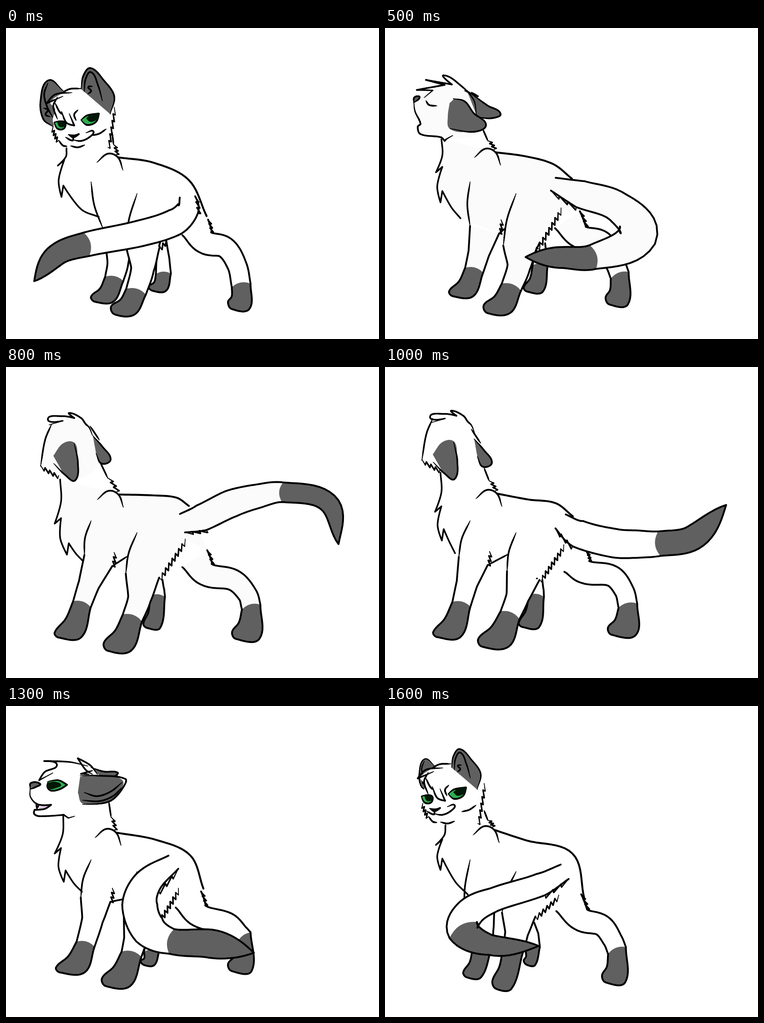
Animation of 820 by 683 pixels, one loop 1700 ms. Source, as an HTML page with a canvas:

```html
<!DOCTYPE html>
<html lang="en">
<head>
<meta charset="utf-8">
<title>Turning cat</title>
<style>
html, body { margin: 0; width: 100%; height: 100%; overflow: hidden; background: #fff; }
canvas { display: block; }
</style>
</head>
<body>
<canvas id="stage" width="820" height="683"></canvas>
<script>
const ctx = document.getElementById('stage').getContext('2d');
const LOOP = 1700, STEP = 100, SAMPLES = 10;
const GREY = '#606060', GREEN = '#2fae50', PUPIL = '#031806', PINK = '#e3c3e6';

// Key poses. A leg is a centre line followed by its toe; the tail is "x,y,width" from base to tip.
const poses = [
  {
    at: 0, head: () => frontHead(0), nape: '233,228', rump: '352,465',
    back: '246,284 325,296 402,334 441,413', chest: '133,264 114,302 122,371 204,415',
    foreFar: '246,440 246,515 238,551 187,590', foreNear: '301,480 300,530 286,579 231,612',
    hindFar: '346,465 345,505 346,540 314,568', hindNear: '416,438 437,470 482,482 508,522 517,565 488,602',
    tail: '399,371,34 400,397,48 372,426,58 295,451,57 177,475,53 113,497,47 62,556,0'
  },
  {
    at: 300, head: dozingHead, nape: '214,192', rump: '388,386', elbow: true,
    back: '244,277 300,289 370,303 412,337', chest: '125,249 112,326 138,390 188,421',
    foreFar: '228,470 226,517 217,546 161,580', foreNear: '304,490 297,535 285,578 231,610',
    hindFar: '343,500 342,520 340,542 316,562', hindNear: '440,460 470,475 494,494 508,528 510,557 467,598',
    tail: '370,345,50 437,372,66 471,424,78 420,470,60 297,489,60 232,485,44 163,480,0'
  },
  {
    at: 500, head: raisedHead, nape: '215,222', rump: '387,395', elbow: true, skin: '#fbfbfb',
    back: '243,273 310,282 370,299 411,331', chest: '124,243 112,317 122,383 166,418',
    foreFar: '219,443 206,495 196,532 141,578', foreNear: '297,480 294,525 278,569 217,609',
    hindFar: '346,472 342,500 341,522 305,570', hindNear: '401,421 428,458 478,470 507,520 516,543 485,592',
    tail: '370,343,30 430,365,60 512,393,66 555,455,86 457,503,54 390,504,46 309,503,0'
  },
  {
    at: 800, head: () => backHead(0), nape: '206,207', rump: '394,378', elbow: true, skin: '#fbfbfb',
    back: '247,280 325,282 375,287 402,305', chest: '119,247 107,344 134,412 168,425',
    foreFar: '203,425 182,478 167,521 107,583', foreNear: '300,458 293,510 278,551 215,606',
    hindFar: '338,466 334,487 333,504 302,564', hindNear: '415,421 440,455 500,468 531,500 539,527 497,582',
    tail: '388,343,42 430,331,58 495,300,60 552,284,52 608,275,43 708,298,42 731,389,0'
  },
  {
    at: 1000, head: () => backHead(1), nape: '218,222', rump: '393,390', elbow: true,
    back: '246,278 315,291 375,299 413,328', chest: '122,232 110,318 125,381 154,409',
    foreFar: '194,426 180,476 168,521 106,582', foreNear: '304,458 291,506 275,545 205,597',
    hindFar: '340,466 335,487 333,503 294,562', hindNear: '419,428 440,450 499,459 526,492 534,524 490,573',
    tail: '386,339,38 424,366,60 505,387,63 555,389,60 603,388,54 677,375,54 750,303,0'
  },
  {
    at: 1300, head: sideHead, nape: '226,210', rump: '379,400', elbow: true,
    back: '242,278 330,294 405,328 434,401', chest: '126,240 107,324 127,386 167,408',
    foreFar: '197,425 190,470 175,523 110,574', foreNear: '295,470 284,515 276,545 211,598',
    hindFar: '322,510 320,525 320,540 296,560', hindNear: '401,425 425,460 487,477 512,500 522,511 488,567',
    tail: '368,343,36 312,387,62 294,436,77 315,492,76 364,517,55 450,522,62 545,542,0'
  },
  {
    at: 1600, head: () => frontHead(1), nape: '218,230', rump: '382,415',
    back: '240,272 310,295 412,324 438,422', chest: '133,262 112,305 122,360 182,414',
    foreFar: '208,458 215,496 213,533 172,585', foreNear: '294,458 289,500 281,537 236,604',
    hindFar: '322,476 323,500 324,530 305,560', hindNear: '404,432 430,468 477,482 501,515 510,537 477,592',
    tail: '395,364,36 343,392,50 240,425,52 188,452,64 172,492,70 232,525,44 338,527,0'
  }
];

// Widths down the leg, and the heel's offset from ankle (x) and toe (y); back to front.
const legShapes = {
  hindFar: { widths: [12, 28, 33], heel: [6, 9] },
  hindNear: { widths: [66, 51, 46, 42, 42], heel: [18, 15] },
  foreFar: { widths: [66, 46, 41], heel: [-2, 11] },
  foreNear: { widths: [74, 50, 45], heel: [-3, 17] }
};

const point = (x, y, w = 0, sharp = false) => ({ x, y, w, sharp });
const mix = (a, b, t) => a + (b - a) * t;
const between = (a, b, t, dx = 0, dy = 0) => point(mix(a.x, b.x, t) + dx, mix(a.y, b.y, t) + dy, mix(a.w, b.w, t));
const corner = p => ({ ...p, sharp: true });
const parse = text => [...text.matchAll(/(\d+),(\d+)(?:,(\d+))?(!?)/g)]
  .map(([, x, y, w, bang]) => point(+x, +y, +(w || 0), bang === '!'));

// Smooth curve through the points; sharp points become corners.
function curve(pts) {
  const last = pts.length - 1, out = [];
  const direction = i => {
    const a = pts[Math.max(i - 1, 0)], b = pts[Math.min(i + 1, last)];
    const size = pts[i].sharp ? Infinity : Math.hypot(b.x - a.x, b.y - a.y) || 1;
    return { x: (b.x - a.x) / size, y: (b.y - a.y) / size };
  };
  for (let i = 0; i < last; i++) {
    const a = pts[i], b = pts[i + 1], da = direction(i), db = direction(i + 1);
    const span = Math.hypot(b.x - a.x, b.y - a.y);
    for (let k = 0; k < SAMPLES; k++) {
      const t = k / SAMPLES, s = t * t * (3 - 2 * t);
      const u = t * (1 - t) * (1 - t) * span, v = t * t * (t - 1) * span;
      out.push(point(mix(a.x, b.x, s) + da.x * u + db.x * v, mix(a.y, b.y, s) + da.y * u + db.y * v,
        mix(a.w, b.w, b.w ? t : t * t)));
    }
  }
  return [...out, pts[last]];
}

// Both edges of a band of varying width around a centre line.
function ribbon(pts) {
  const line = curve(pts);
  const edge = side => line.map((p, i) => {
    const a = line[Math.max(i - 1, 0)], b = line[Math.min(i + 1, line.length - 1)];
    const k = side * p.w / 2 / (Math.hypot(b.x - a.x, b.y - a.y) || 1);
    return point(p.x - (b.y - a.y) * k, p.y + (b.x - a.x) * k);
  });
  return { right: edge(1), left: edge(-1) };
}

function trace(line) {
  ctx.beginPath();
  line.forEach(p => ctx.lineTo(p.x, p.y));
}

function fill(line, color) {
  trace(line);
  ctx.fillStyle = color;
  ctx.fill();
}

function stroke(line, width) {
  trace(line);
  ctx.lineWidth = width;
  ctx.stroke();
}

// Brush line that thins out at both ends.
function brush(pts, width = 3.6) {
  const line = curve(pts), n = line.length - 1;
  for (let i = 0; i < n; i++) {
    const u = (i + 0.5) / n;
    stroke(line.slice(i, i + 2), width * (0.4 + 0.6 * Math.min(1, 5 * u, 5 * (1 - u))));
  }
}

const pen = (...texts) => texts.forEach(text => brush(parse(text)));
const patch = (text, color = GREY) => fill(curve(parse(text)), color);

function shape(text, color = GREY) {
  patch(text, color);
  pen(text);
}

// Row of pointed tufts; positive depth grows to the right of the direction of travel.
function fur(a, b, teeth, depth) {
  const size = Math.hypot(b.x - a.x, b.y - a.y) || 1;
  const nx = -(b.y - a.y) / size * depth, ny = (b.x - a.x) / size * depth;
  const pts = [];
  for (let i = 0; i < teeth; i++) {
    pts.push(corner(between(a, b, i / teeth)), corner(between(a, b, (i + 1.1) / teeth, nx, ny)));
  }
  brush([...pts, b], 3.2);
}

function furAlong(text, teeth, depth) {
  const [a, b] = parse(text);
  fur(a, b, teeth, depth);
}

// Grey end of a limb, closed by an arc that bulges back up the limb.
function greyEnd(line, bulge) {
  const a = line[0], b = line[line.length - 1];
  trace(line);
  ctx.quadraticCurveTo((a.x + b.x) / 2 + bulge * (b.y - a.y), (a.y + b.y) / 2 - bulge * (b.x - a.x), a.x, a.y);
  ctx.fillStyle = GREY;
  ctx.fill();
}

function drawLeg({ right, left, toe }, [heelX, drop], skin) {
  const front = right[right.length - 1], rear = left[left.length - 1];
  const paw = curve([front, between(front, toe, 0.5, 4, 4), toe, point(toe.x + 8, toe.y + drop),
    point((front.x + rear.x) / 2 + heelX, toe.y + drop), rear]);
  const outline = [...right, ...paw, ...left.slice().reverse()];
  fill(outline, skin);
  greyEnd(paw, 0.3);
  stroke(outline, 4);
}

function drawTail(pts, skin) {
  const { right, left } = ribbon(pts), band = 4 * SAMPLES;
  const outline = [...right, ...left.slice().reverse()];
  fill(outline, skin);
  greyEnd([...right.slice(band), ...left.slice(band).reverse()], 0.35);
  stroke(outline, 4);
  const lower = pts[2].x > pts[0].x;
  const edge = lower ? right : left;
  fur(edge[0], edge[SAMPLES], 3, lower ? 6 : -6);
}

function drawChest([throat, ruff, breast, belly]) {
  const upper = between(ruff, ruff, 0, 14, -12), lower = between(breast, breast, 0, 4, -25);
  const sag = 0.3 * (belly.x - lower.x - 20);
  return curve([throat, between(throat, ruff, 0.5, 8), corner(ruff), corner(upper),
    between(upper, breast, 0.55, -9), corner(breast), corner(lower), between(lower, belly, 0.5, 0, sag), belly]);
}

function layer(dx, dy, scale, paint) {
  ctx.save();
  ctx.translate(dx, dy);
  ctx.scale(scale, scale);
  paint();
  ctx.restore();
}

function eye(text, pivotX, pivotY) {
  const pivot = point(pivotX, pivotY);
  shape(text, GREEN);
  fill(curve(parse(text).map(p => between(pivot, p, 0.7))), PUPIL);
}

// Features slide by different amounts as the face turns away.
function frontHead(turn) {
  layer(22 * turn, 36 * turn, 1 - 0.3 * turn, () => {
    shape('104,217 82,200 76,160 93,115 126,138');
    pen('92,121 84,145 90,172 103,197', '83,176 92,180 87,190 97,195');
  });
  layer(-20 * turn, -6 * turn, 1, () => {
    patch('128,140 98,163 108,178 103,205 118,222 130,185', '#fff');
    pen('121,144 140,134 165,133');
  });
  layer(turn, 17 * turn, 1 - 0.12 * turn, () => {
    shape('165,134 170,105 186,88 215,115 238,150 229,189');
    pen('172,140 175,112 187,97 202,125 212,160', '190,128 181,130 187,138 180,145');
  });
  layer(-18 * turn, -6 * turn, 1, () => {
    pen('145,142 108,146 90,165! 125,150', '113,152 104,172 113,200', '108,165 117,183 124,190',
      '122,183 133,208 150,214! 139,188', '158,180 150,190 154,203');
  });
  layer(-26 * turn, -9 * turn, 1, () => {
    eye('165,202! 178,192 204,188! 198,206 178,213 165,202!', 202, 190);
    eye('106,207! 118,205 130,208 127,221 113,221 106,207!', 128, 207);
  });
  layer(-39 * turn, -9 * turn, 1, () => {
    shape('137,234 150,236 160,233! 148,240 137,234');
    pen('148,240 146,247 131,240', '148,246 165,248 183,240 192,227 176,230');
  });
  layer(-20 * turn, -4 * turn, 1, () => {
    furAlong('103,218 116,247', 4, 6);
    pen('116,247 125,258 134,260', '142,259 158,262 173,257', '189,236 205,232 220,222');
    furAlong('238,174 224,262', 6, -5);
  });
}

function dozingHead() {
  shape('137,124 160,110 172,107 177,130');
  patch('160,148 165,137 178,131 215,140 200,190 178,187 175,163');
  shape('177,131 215,129 253,130 245,162 212,190 184,196');
  pen('177,160 210,154 247,138 235,165 205,187', '190,181 207,173 195,181');
  pen('177,130 140,125 106,121! 128,127 95,135 68,149! 110,141', '100,156 85,165 74,190',
    '108,163 90,170 80,182', '114,183 135,186 157,186');
  pen('76,185 66,200 74,216 79,233! 100,241 125,248', '80,205 76,212 96,223! 84,221', '90,231 110,232 126,240');
  shape('67,194 80,199 96,200! 82,206 67,194');
  pen('149,246 170,243 192,230 198,200', '203,194 204,217! 199,206');
}

function raisedHead() {
  patch('66,152 65,185 74,230 130,243 215,225 200,160 150,115 90,140', '#fbfbfb');
  shape('180,137 225,170 254,188 235,198 203,196');
  patch('153,155 175,162 200,205 180,227 142,221 138,195 142,165');
  shape('150,155 175,161 195,187 222,213 195,228 143,221');
  pen('86,153 105,137! 70,136! 131,125! 90,114! 147,124! 129,104 165,125 195,158 201,193', '175,138 204,150! 190,141');
  shape('63,164 65,152 76,152 64,164');
  pen('63,160 66,183 78,210 72,217 78,233 123,240 131,248! 135,244 149,236', '90,160 97,169 114,171');
}

function backHead(turn) {
  if (!turn) patch('95,125 82,185 76,215 110,235 160,245 205,210 195,160 175,120 140,103', '#fbfbfb');
  layer(turn, -3 * turn, 1, () => {
    patch('104,195 125,168 150,166 157,195 152,249 125,232');
    pen('105,212 130,237 152,249 158,210 150,168');
  });
  layer(5 * turn, 7 * turn, 1, () => {
    shape('191,151 212,175 230,203 210,212 198,190');
    pen('185,130 205,160');
  });
  layer(5 * turn, -13 * turn, 1, () => {
    pen('100,126 86,160 76,218');
    furAlong('76,216 116,238', 4, 7);
  });
  layer(7 * turn, -5 * turn, 1, () => {
    pen('95,127 125,118! 92,115 125,108 150,112! 139,101 165,112 175,125 183,133 190,150');
  });
}

function sideHead() {
  shape('187,135 215,144 245,146 238,155 205,152');
  patch('163,155 190,152 255,162 245,195 215,212 168,214 158,190');
  pen('163,153 200,153 262,160 258,178 235,205 210,214 168,216', '172,190 200,198 230,188 255,168',
    '168,207 205,209 235,198 254,180');
  pen('190,150 175,140 158,115! 185,130 201,150', '180,132 140,123 84,121! 112,129 85,145 73,163! 103,147',
    '190,142! 165,149! 183,150');
  eye('92,166! 115,163 134,173! 120,182 100,186 91,178 92,166', 91, 174);
  shape('53,182 55,169 75,171 65,178 53,183');
  patch('72,222 94,218 85,226 73,227', PINK);
  pen('53,180 54,200 70,216 99,217! 85,226 63,228! 62,237 74,242 127,239! 137,246! 151,242', '66,214 68,224! 73,217');
}

function draw(time) {
  const index = poses.findLastIndex(p => p.at <= time);
  const from = poses[index], to = poses[(index + 1) % poses.length];
  const t = (time - from.at) / ((to.at || LOOP) - from.at);
  const near = t < 0.5 ? from : to, skin = near.skin || '#fff';
  const part = name => {
    const goal = parse(to[name]);
    return parse(from[name]).map((p, i) => between(p, goal[i], t));
  };

  ctx.fillStyle = '#fff';
  ctx.fillRect(0, 0, 820, 683);
  ctx.strokeStyle = '#000';
  ctx.lineCap = ctx.lineJoin = 'round';

  const back = curve(part('back')), chest = drawChest(part('chest'));
  const [nape] = part('nape'), [rump] = part('rump');
  const legs = {};
  for (const [name, { widths }] of Object.entries(legShapes)) {
    const spine = part(name), toe = spine.pop();
    legs[name] = { ...ribbon(spine.map((p, i) => ({ ...p, w: widths[i] }))), toe };
  }
  const fore = legs.foreFar, thigh = legs.foreNear, haunch = legs.hindNear;

  fill([...chest, fore.left[0], thigh.right[0], thigh.left[0], rump, haunch.left[0], ...back.slice().reverse()], skin);
  for (const name in legs) drawLeg(legs[name], legShapes[name].heel, skin);
  fur(haunch.left[0], haunch.left[SAMPLES], 3, -5);
  stroke(back, 4.2);
  stroke(chest, 3.6);

  // Shoulder, upper arm and thigh follow from the body and the legs.
  const top = back[0], arm = point(187, 338), hip = point(288, 364);
  brush([[-46, 11], [-22, -8], [0, 0], [11, 28]].map(([x, y]) => point(top.x + x, top.y + y)));
  brush([arm, between(arm, fore.right[0], 0.5, -6), fore.right[0]]);
  brush([hip, between(hip, thigh.right[0], 0.5, -6), thigh.right[0]]);
  if (near.elbow) {
    const elbow = fore.left[0];
    brush([elbow, between(elbow, thigh.right[0], 1, 4, -38)]);
    fur(point(elbow.x + 4, elbow.y - 30), elbow, 3, -6);
  }
  fur(rump, thigh.left[0], Math.ceil(Math.hypot(rump.x - thigh.left[0].x, rump.y - thigh.left[0].y) / 13), -8);

  drawTail(part('tail'), skin);

  const neck = between(nape, top, 0.5, -3);
  brush([nape, neck]);
  fur(neck, between(top, top, 0, -4, -6), 3, -6);
  near.head();
}

let shown = -1;
function tick(now) {
  const time = Math.floor((now % LOOP) / STEP) * STEP;
  if (time !== shown) draw(shown = time);
  requestAnimationFrame(tick);
}
draw(0);
requestAnimationFrame(tick);
</script>
</body>
</html>
```
